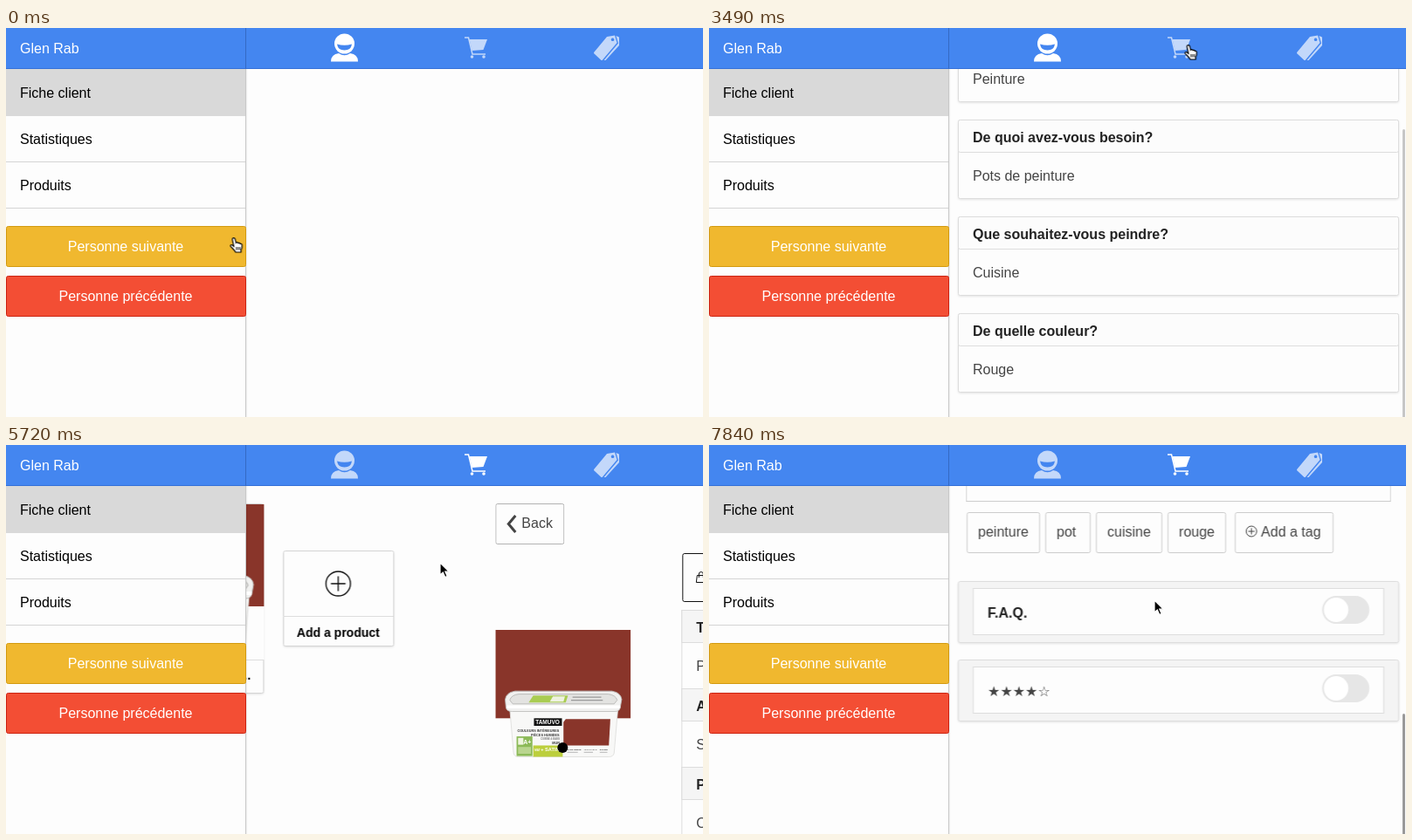
Recreate the animation shown at these times as an HTML page. Size 798 px wide and 446 px high, loop 8000 ms.

```html
<!DOCTYPE html>
<html lang="fr">
<head>
<meta charset="utf-8">
<title>Fiche client</title>
<style>
  html, body { margin: 0; width: 100%; height: 100%; overflow: hidden; background: #fdfdfd; }
  svg { display: block; }
  #stage { width: 798px; height: 446px; }
  text { font: 16px "Liberation Sans", Arial, sans-serif; fill: #444; }
  .b { font-weight: bold; fill: #222; }
  .s { font-size: 14px; fill: #000; }
  .k { fill: #000; }
  .w { fill: #fff; }
  .m { text-anchor: middle; }
  .star { font-family: "DejaVu Sans", sans-serif; }
  .card { filter: drop-shadow(0 1px 1px rgba(0,0,0,.1)); }
</style>
</head>
<body>
<svg id="stage" viewBox="0 0 798 446"></svg>
<script>
const LOOP = 8000;
const BLUE = '#4486f0';

const box = (x, y, w, h, fill = '#fff', stroke = '#ddd', r = 2, extra = '') =>
  `<rect x="${x + .5}" y="${y + .5}" width="${w - 1}" height="${h - 1}" rx="${r}" fill="${fill}" stroke="${stroke}" ${extra}/>`;
const fill = (x, y, w, h, color, extra = '') =>
  `<rect x="${x}" y="${y}" width="${w}" height="${h}" fill="${color}" ${extra}/>`;
const text = (x, y, str, cls = '', extra = '') =>
  `<text x="${x}" y="${y}" class="${cls}" ${extra}>${str}</text>`;
const tiny = (x, y, size, str, color = '#333') =>
  text(x, y, str, 'b', `style="font-size:${size}px;fill:${color}"`);
const group = (id, body, extra = '') => `<g id="${id}" ${extra}>${body}</g>`;

const answerCard = ([question, answer], i) => {
  const y = 76 + 111 * i;
  return box(285, y, 505, 91, '#fdfdfd', '#ddd', 2, 'class="card"') +
    box(285, y, 505, 38, '#f5f5f5', '#ddd', 2, 'class="head"') +
    text(302, y + 26, question, 'b') + text(302, y + 70, answer);
};

const specRow = ([name, value], i) => {
  const y = 189 + 90 * i;
  return box(508, y, 273, 91, '#fdfdfd', '#ddd', 0) + box(508, y, 273, 38, '#f5f5f5', '#ddd', 0) +
    text(525, y + 26, name, 'b') + text(525, y + 70, value);
};

const tag = ([x, w, label]) =>
  box(x, 551, w, 47, '#fdfdfd', '#ccc') + text(x + 13, 579, label);

const toggleCard = (y, label) =>
  box(285, y, 505, 71, '#f4f4f4', '#ddd', 2, 'class="card"') + box(302, y + 8, 471, 54, '#fdfdfd', '#ddd', 0) + label +
  fill(702, y + 17, 54, 32, '#e6e6e6', 'rx="16"') + `<circle cx="718" cy="${y + 33}" r="14" fill="#fff"/>`;

const plus = (x, y, r, width, color) =>
  `<g fill="none" stroke="${color}" stroke-width="${width}"><circle cx="${x}" cy="${y}" r="${r}"/>
   <path d="M${x - r * .6} ${y}h${r * 1.2}M${x} ${y - r * .6}v${r * 1.2}"/></g>`;

const defs = `<defs>
  <clipPath id="view"><rect x="275" y="47" width="523" height="399"/></clipPath>
  <linearGradient id="edge"><stop stop-color="#000" stop-opacity=".06"/><stop offset="1" stop-color="#000" stop-opacity="0"/></linearGradient>
  <symbol id="paint" viewBox="0 0 179 179">
    ${fill(0, 0, 179, 179, '#fdfdfd')}${fill(0, 0, 179, 117, '#89352a')}
    <path d="M19 104L24 163q1 5 6 5H150q6 0 7-5L162 104Z" fill="#f8f8f7" stroke="#dededc"/>
    <path d="M13 92q1-9 13-11H154q12 2 13 11l-2 11q-1 5-7 5H22q-7 0-8-5Z" fill="#f1f1f0" stroke="#bdbdbb"/>
    <path d="M19 93q2-7 12-8H149q10 1 12 8l-4 5H23Z" fill="#e3e3e1" stroke="#b5b5b3"/>
    <path d="M50 87H96L93 96H44Z" fill="#a9cc52"/><path d="M76 88H92L90 95H72Z" fill="#eef2e0"/>
    <path d="M102 89H140M100 93H142" stroke="#999" stroke-width="1.500"/>
    <path d="M15 102H165" stroke="#fff" stroke-width="4"/>
    <path d="M93 118H152L150 153H90V122Z" fill="#89352a"/>
    ${fill(51, 117, 37, 10, '#111')}${tiny(53, 125, 7.5, 'TAMUVO', '#fff')}
    ${tiny(29, 135, 4.4, 'COULEURS INTÉRIEURES')}${tiny(47, 141, 4.4, 'PIÈCES HUMIDES')}
    ${tiny(60, 146, 3, 'CUISINE &amp; BAINS', '#777')}${tiny(75, 151.5, 4.5, 'MUR')}
    ${fill(28, 141, 21, 26, '#8cba58')}${fill(30, 143, 7, 9, '#eef5df')}${tiny(37, 151, 8, 'A+', '#fff')}
    ${fill(30, 155, 17, 9, '#b9d58f')}
    ${fill(50, 153, 39, 15, '#bccf3c')}${tiny(52, 160, 3.5, 'MAT', '#fff')}${tiny(60, 161, 6.5, '+ SATIN', '#fff')}
    ${tiny(95, 159, 2.8, 'SANS ODEUR')}${tiny(117, 159, 2.8, 'LESSIVABLE', '#777')}${tiny(138, 159, 2.8, 'RAPIDE')}
    <path d="M95 162h14M117 162h12M138 162h10" stroke="#aaa"/>
  </symbol>
</defs>`;

const answers = group('answers', group('answersScroll', [
  ['Quel rayon vous interesse?', 'Peinture'],
  ['De quoi avez-vous besoin?', 'Pots de peinture'],
  ['Que souhaitez-vous peindre?', 'Cuisine'],
  ['De quelle couleur?', 'Rouge']
].map(answerCard).join('')) + fill(794, 47, 3, 331, '#999', 'id="answersBar" rx="1.5"'));

const products = group('products', group('productsSlide',
  box(374, 67, 179, 218, '#fdfdfd', '#d4d4d4', 2, 'class="card"') +
  '<use href="#paint" x="374" y="68" width="179" height="179"/>' + fill(374, 246, 179, 1, '#ddd') +
  text(463, 269, 'Peinture cuisine et b…', 'b s m') +
  box(575, 121, 127, 110, '#fdfdfd', '#d4d4d4', 2, 'class="card"') + fill(575, 196, 126, 1, '#ddd') +
  plus(638, 159, 14, 1.4, '#111') + text(638, 220, 'Add a product', 'b s m')));

const detail = group('detail', group('detailSlide', group('detailScroll',
  box(295, 67, 79, 47, '#fdfdfd', '#b2b2b2') +
  '<path d="M318 81L310 90.500L318 100" fill="none" stroke="#444" stroke-width="3"/>' + text(325, 95, 'Back') +
  '<use href="#paint" x="295" y="212" width="155" height="155"/><circle cx="372" cy="347" r="6"/>' +
  box(509, 124, 90, 56, '#fdfdfd', '#111') +
  '<path d="M526 149.500H535L536 157.500H525ZM528 152V148a2.500 2.500 0 0 1 5 0V152" fill="none" stroke="#111"/>' +
  text(540, 157, '36.95€', 's') +
  box(721, 124, 59, 56, '#fdfdfd', '#111') + text(741, 157, '★', 's star') + text(757, 157, '4', 's') +
  [['Type de peinture', 'Peinture acrylique'], ['Aspect', 'Satin'], ["Pret à l'emploi", 'Oui']].map(specRow).join('') +
  box(294, 485, 487, 54, '#fdfdfd', '#ccc', 0) + text(311, 517, 'Peinture satinée pour cuisine et bains') +
  [[295, 84, 'peinture'], [385, 52, 'pot'], [443, 76, 'cuisine'], [525, 67, 'rouge'], [602, 113, '']].map(tag).join('') +
  plus(621, 573, 6, 1, '#444') + text(632, 579, 'Add a tag') +
  toggleCard(630, text(319, 672, 'F.A.Q.', 'b')) + toggleCard(720, text(319, 762, '★★★★☆', 'star'))) +
  fill(794, 48, 3, 195, '#999', 'id="detailBar" rx="1.5"')));

const sidebar =
  fill(275, 47, 2, 399, 'url(#edge)') + fill(0, 47, 274, 399, '#fdfdfd') + fill(274, 47, 1, 399, '#c8c8c8') +
  fill(0, 47, 274, 54, '#d9d9d9') + fill(0, 153, 274, 1, '#d4d4d4') + fill(0, 206, 274, 1, '#d4d4d4') +
  text(16, 80, 'Fiche client', 'k') + text(16, 133, 'Statistiques', 'k') + text(16, 186, 'Produits', 'k') +
  box(0, 227, 275, 47, '#f0b82f', '#d39a10') +
  group('pressed', box(0, 227, 275, 47, '#d09100', '#b07a00')) +
  box(0, 284, 275, 47, '#f34e34', '#cc2311') +
  text(137, 256, 'Personne suivante', 'w m') + text(137, 313, 'Personne précédente', 'w m');

const header = fill(0, 0, 798, 47, BLUE) + fill(0, 46, 798, 1, '#3470d8') + fill(274, 0, 1, 47, '#3569c4') +
  text(16, 29, 'Glen Rab', 'w') +
  group('person', `<circle cx="387.500" cy="18" r="11.500"/>
    <path d="M379 18.500Q387.500 21 396 18.500Q395 25.500 387.500 25.500Q380 25.500 379 18.500Z" fill="${BLUE}"/>
    <path d="M372 38.500Q372 30 381 29Q387.500 33.500 394 29Q403 30 403 38.500Z"/>`, 'fill="#fff"') +
  group('cart', `<path d="M525 11h4.500l4.500 19h15" fill="none" stroke="#fff" stroke-width="1.500"/>
    <path d="M530.500 13H551L546.500 25L533.500 26Z"/><circle cx="533.500" cy="33" r="1.800"/><circle cx="547" cy="33" r="1.800"/>`, 'fill="#fff"') +
  `<g fill="#fff" opacity=".68"><path fill-rule="evenodd" d="M688 10L697 8.500L699.500 17L683 36.500q-1 1-2 0L673.500 29.500q-1-1 0-2ZM694.500 11.500a1.800 1.800 0 1 0 .1 0Z"/>
    <path d="M698.500 9L702 10.500L702 20L686.500 37L684.500 37L701 17.500Z"/></g>`;

const status = group('status',
  '<path d="M-1 446.500V430.500H464q4 0 4 4V447" fill="#ebebeb" stroke="#b5b5b5"/>' +
  text(4, 443, 'tuvex.zz/pages/homelydat/app/vendor.html#/tab/product-detail/7a09e41cb835d2f6a190cd48', '',
    'style="font-size:11px;fill:#222"'));

const cursor = group('cursor',
  group('arrow', '<path d="M0 0V14L3.300 11L5.800 16.500L8.200 15.400L5.800 10.200H10.300Z" fill="#000" stroke="#fff" stroke-width="1.200"/>') +
  group('hand', `<path d="M-1.300 1C-1-.8 1.400-.8 1.900 .9L3 5.300C3.600 4.300 5.100 4.500 5.500 5.600C6.200 4.900 7.500 5.300 7.800 6.400C8.700 6 9.700 6.500 9.800 7.600
    C10.200 10.500 9.500 12 8.700 13.600V16H2.400C1.600 13.800-1 11.800-3 9.600C-4.200 8.200-2.800 6.800-1.200 8L.4 9.200Z" fill="#fff" stroke="#000" stroke-width="1.200"/>
    <path d="M3.400 10v3.500M5.400 10v3.500M7.400 10v3.500" stroke="#000" stroke-width=".9"/>`, 'transform="translate(-1.5 0)"'));

const stage = document.getElementById('stage');
stage.innerHTML = defs + fill(0, 0, 798, 446, '#fdfdfd') +
  `<g clip-path="url(#view)">${answers}${products}${detail}</g>` + sidebar + header + status + cursor;

// steps: [time in ms, value, easing towards the next step]
function animate(selector, prop, steps, easing = 'linear') {
  const frames = steps.map(([t, value, ease = easing]) => ({ offset: t / LOOP, [prop]: value, easing: ease }));
  if (frames[0].offset > 0) frames.unshift({ ...frames[0], offset: 0, easing: 'linear' });
  frames.push({ ...frames[frames.length - 1], offset: 1 });
  for (const el of document.querySelectorAll(selector))
    el.animate(frames, { duration: LOOP, iterations: Infinity });
}
const move = (id, steps) =>
  animate('#' + id, 'transform', steps.map(([t, x, y, ease]) => [t, `translate(${x}px,${y}px)`, ease]));
const fade = (id, steps) => animate('#' + id, 'opacity', steps);
const flip = (id, steps) => animate('#' + id, 'opacity', steps, 'steps(1, end)');
const show = (id, from, to) => flip(id, [[0, 0], [from, 1], [to, 0]]);

const OUT = 'cubic-bezier(.3,.5,.5,1)';
const SLIDE = 'cubic-bezier(.4,.5,.2,1)';

show('pressed', 450, 1260);
show('answers', 1080, 3640);
show('products', 3640, 6310);
show('detail', 5510, LOOP);
show('status', 4890, 5600);
flip('person', [[0, 1], [3640, .68]]);
flip('cart', [[0, .68], [3640, 1]]);

move('answersScroll', [[1880, 0, 0, OUT], [2420, 0, -117], [2480, 0, -117, OUT], [3140, 0, -82]]);
move('answersBar', [[1880, 0, 0, OUT], [2420, 0, 104], [2480, 0, 104, OUT], [3140, 0, 69]]);
fade('answersBar', [[1880, 0], [1980, 1], [3230, 1], [3490, .55], [3640, 0]]);
animate('.head', 'fill', [[2570, '#f5f5f5'], [3140, '#fcfcfc']]);

move('productsSlide', [[5510, 0, 0, SLIDE], [6310, -523, 0]]);
move('detailSlide', [[5510, 523, 0, SLIDE], [6310, 0, 0]]);
move('detailScroll', [[6820, 0, 0, OUT], [7840, 0, -474]]);
move('detailBar', [[6820, 0, 0, OUT], [7840, 0, 260]]);
fade('detailBar', [[6310, 0], [6490, .9], [6760, .5], [6910, 1]]);

move('cursor', [
  [0, 262, 241], [270, 239, 245], [1170, 239, 245], [1400, 330, 283], [1800, 505, 188],
  [1880, 505, 188], [2420, 505, 175], [2480, 505, 175], [3140, 552, 22], [3230, 552, 22],
  [3490, 550, 20], [4090, 550, 20], [4530, 509, 135], [4620, 509, 135], [4920, 582, 108],
  [5240, 497, 135], [6400, 497, 135], [6760, 494, 125], [6820, 494, 125], [7200, 510, 178]
]);
const handSteps = [[0, 1], [1260, 0], [3050, 1], [4180, 0], [4360, 1], [4800, 0], [4890, 1], [5600, 0]];
flip('hand', handSteps);
flip('arrow', handSteps.map(([t, on]) => [t, 1 - on]));
</script>
</body>
</html>
```
